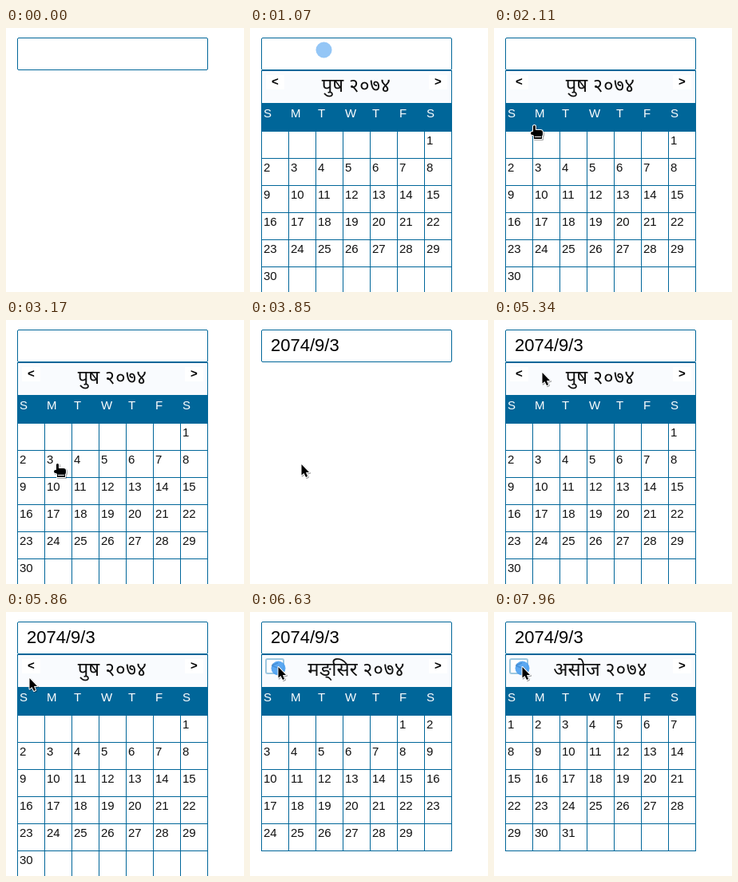
Recreate the animation shown at these times as an HTML page with a canvas. Size 298 px wide and 331 px high, loop 8000 ms.

```html
<!DOCTYPE html>
<html lang="ne">
<head>
<meta charset="utf-8">
<title>Date picker</title>
<style>
html, body { margin: 0; width: 100%; height: 100%; overflow: hidden; background: #fff; }
canvas { display: block; }
</style>
</head>
<body>
<canvas id="stage" width="298" height="331"></canvas>
<script>
const ctx = document.getElementById('stage').getContext('2d');
const LOOP = 8000, BLUE = '#006699';
const CELL = 34, LEFT = 14, WIDTH = 239, TITLE_TOP = 53, HEAD_TOP = 94, GRID_TOP = 129;
const SANS = '"Liberation Sans", Arial, sans-serif';
const DEVA = '"Noto Sans Devanagari", "Noto Sans", sans-serif';

// The user opens the picker, picks a day, reopens it and pages back
const OPEN = 870, PICK = 3460, REOPEN = 4980, BACK = [6550, 7250, 7920];
const CLICKS = [OPEN, PICK, REOPEN, ...BACK];
const REACT = 80, PAGE_REACT = 30, CLICK_TIME = 280, POINTER_SHOWN = 1680;

// Name and length, newest first; the newest starts on a Saturday
const MONTHS = [['पुष', 30], ['मङ्सिर', 29], ['कार्तिक', 30], ['असोज', 31]];
const NEWEST_FIRST_DAY = 6;

// Pointer moves that ease out towards each place
const HOME = { x: 92, y: 25 };
const MOVES = [
  { start: 1570, end: 2170, x: 50, y: 123 },
  { start: 2170, end: 2390, x: 70, y: 174 },
  { start: 2510, end: 2720, x: 64, y: 180 },
  { start: 3850, end: 4530, x: 107, y: 33 },
  { start: 5100, end: 5780, x: 27, y: 88 },
  { start: 5800, end: 6170, x: 35, y: 68 }
];

const clamp = v => Math.min(1, Math.max(0, v));
const easeOut = k => 1 - (1 - k) ** 2;
const isOpen = t => (t >= OPEN + REACT && t < PICK + REACT) || t >= REOPEN + REACT;

function pointerAt(t) {
  let { x, y } = HOME;
  for (const m of MOVES) {
    const k = easeOut(clamp((t - m.start) / (m.end - m.start)));
    x += (m.x - x) * k;
    y += (m.y - y) * k;
  }
  return { x: Math.round(x), y: Math.round(y) };
}

function monthAt(t) {
  const index = BACK.filter(b => t >= b + PAGE_REACT).length;
  let first = NEWEST_FIRST_DAY;
  for (let i = 1; i <= index; i++) first = (first - MONTHS[i][1] + 35) % 7;
  const [name, days] = MONTHS[index];
  return { index, name, days, first };
}

function text(str, x, y, font, color = '#111', align = 'left') {
  ctx.font = font;
  ctx.textAlign = align;
  ctx.fillStyle = color;
  ctx.fillText(str, x, y);
}

function rect(x, y, w, h, color) {
  ctx.fillStyle = color;
  ctx.fillRect(x, y, w, h);
}

function frame(x, y, w, h, radius, color, width = 1) {
  ctx.beginPath();
  ctx.roundRect(x, y, w, h, radius);
  ctx.strokeStyle = color;
  ctx.lineWidth = width;
  ctx.stroke();
}

function drawTitle(month) {
  rect(LEFT, TITLE_TOP, WIDTH, HEAD_TOP - TITLE_TOP, '#f9fbfe');
  rect(LEFT, TITLE_TOP, WIDTH, 1, BLUE);
  for (const [sign, x] of [['<', 20], ['>', 224]]) {
    rect(x, 59, 23, 18, '#fff');
    text(sign, x + 7, 72, `bold 15px ${SANS}`, '#000');
  }
  text(month.name + ' २०७४', 133, 80, `24px ${DEVA}`, '#111', 'center');
  if (month.index > 0) frame(20, 59, 22, 18, 2, '#9cc7e0', 2);
}

function drawGrid(month) {
  const rows = Math.ceil((month.first + month.days) / 7);
  const height = rows * CELL;
  const font = `15px ${SANS}`;

  rect(LEFT, HEAD_TOP, WIDTH, GRID_TOP + 1 - HEAD_TOP, BLUE);
  [...'SMTWTFS'].forEach((d, i) => text(d, LEFT + 3 + i * CELL, 112, font, '#fff'));

  for (let c = 0; c <= 7; c++) rect(LEFT + c * CELL, GRID_TOP, 1, height, BLUE);
  for (let r = 1; r <= rows; r++) rect(LEFT, GRID_TOP + r * CELL, WIDTH, 1, BLUE);
  for (let d = 1; d <= month.days; d++) {
    const n = month.first + d - 1;
    text(d, LEFT + 3 + n % 7 * CELL, GRID_TOP + 17 + Math.floor(n / 7) * CELL, font);
  }
}

function drawCalendar(t) {
  const month = monthAt(t);
  drawTitle(month);
  for (const x of [LEFT, LEFT + WIDTH - 1]) rect(x, TITLE_TOP, 1, HEAD_TOP - TITLE_TOP, BLUE);
  drawGrid(month);
}

function drawClick(t) {
  const time = CLICKS.find(c => t >= c && t < c + CLICK_TIME);
  if (time === undefined) return;
  const { x, y } = pointerAt(time);
  const age = t - time;
  const fade = clamp((age - 160) / 120);
  ctx.globalAlpha = 0.9 * (1 - fade);
  ctx.beginPath();
  ctx.arc(x + 0.5, y + 2.5, 3 + 6 * clamp(age / 40) + 3 * fade, 0, Math.PI * 2);
  ctx.fillStyle = '#4a9ff0';
  ctx.fill();
  ctx.globalAlpha = 1;
}

function handShape() {
  const path = new Path2D();
  path.roundRect(-1, 0, 3, 12, 1.5);
  path.roundRect(-1, 6, 12, 8, 3);
  path.roundRect(-4, 8, 5, 4, 2);
  path.rect(0, 12, 10, 5);
  return path;
}

function arrowShape() {
  return new Path2D('M.5 1V14.5L3.5 12 6 17 8 16 6 11H10Z');
}

function drawPointer(t) {
  if (t < POINTER_SHOWN) return;
  const { x, y } = pointerAt(t);
  const hand = y < TITLE_TOP || (isOpen(t) && y > HEAD_TOP);
  const path = hand ? handShape() : arrowShape();
  ctx.save();
  ctx.translate(x, y);
  ctx.lineJoin = 'round';
  ctx.lineWidth = 2;
  ctx.strokeStyle = '#fff';
  ctx.shadowColor = 'rgba(0, 0, 0, 0.35)';
  ctx.shadowOffsetX = ctx.shadowOffsetY = 1;
  ctx.stroke(path);
  ctx.shadowColor = 'transparent';
  ctx.fillStyle = '#000';
  ctx.fill(path);
  if (hand) rect(1, 14, 8, 1, '#fff');
  ctx.restore();
}

function draw(t) {
  rect(0, 0, 298, 331, '#fff');
  if (isOpen(t)) drawCalendar(t);
  frame(LEFT + 0.5, 12.5, WIDTH - 1, 40, 1.5, BLUE);
  if (t >= PICK + REACT) text('2074/9/3', 26, 39, `22px ${SANS}`, '#000');
  drawClick(t);
  drawPointer(t);
}

const start = performance.now();
function tick() {
  draw((performance.now() - start) % LOOP);
  requestAnimationFrame(tick);
}
tick();
</script>
</body>
</html>
```
